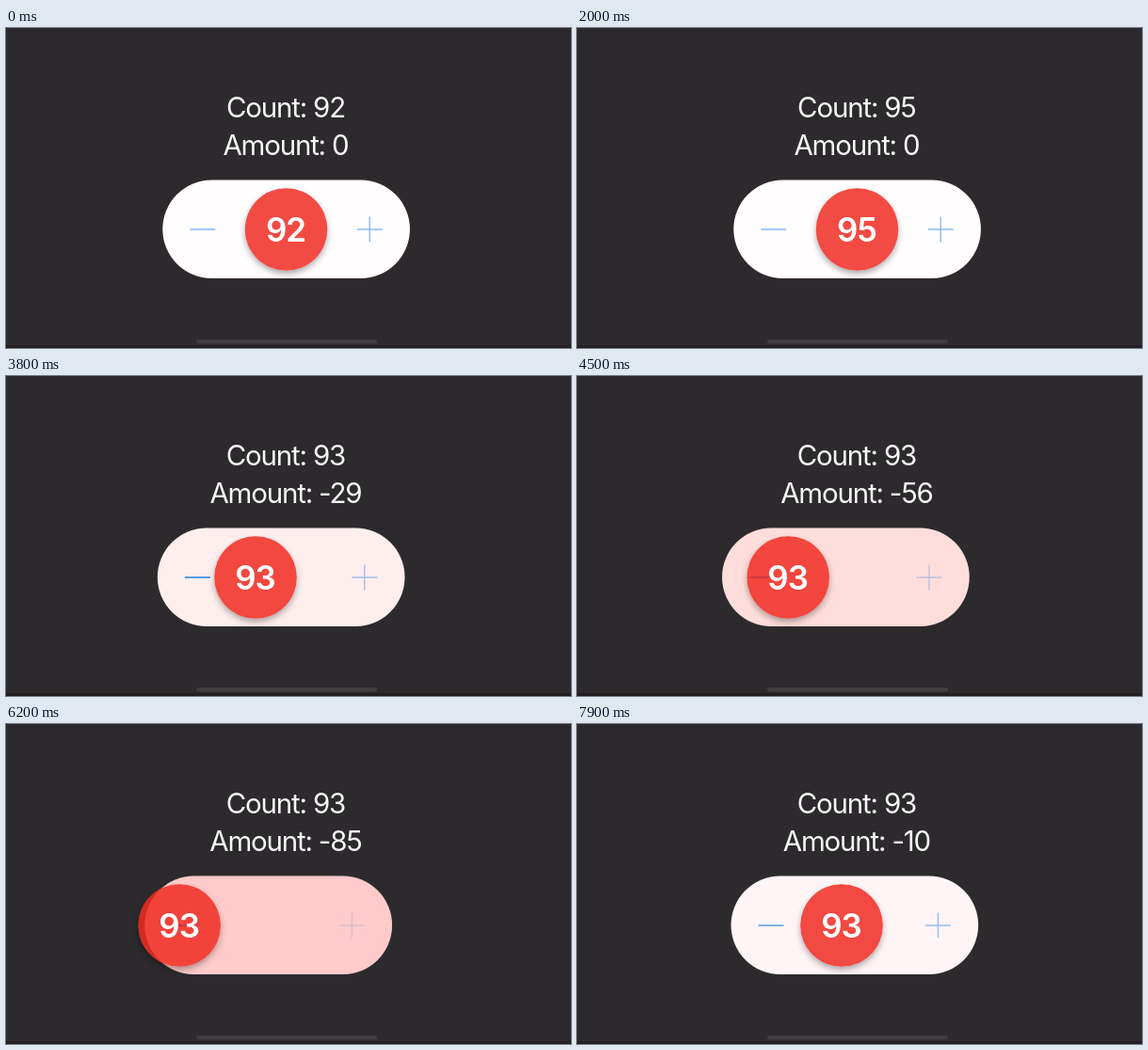
Write an HTML page with a canvas that moves like this. It is 600 by 340 pixels and loops after 8 s.

```html
<!DOCTYPE html>
<html lang="en">
<head>
<meta charset="utf-8">
<title>Stepper</title>
<style>
html, body { margin: 0; width: 100%; height: 100%; overflow: hidden; background: #2c2a2c; }
canvas { display: block; width: 600px; height: 340px; }
</style>
</head>
<body>
<canvas id="stage"></canvas>
<script>
const LOOP = 8000, STEP = 100;
const CX = 297.5, CY = 214, KNOB_R = 43.8, REACH = 130;
const FONT = 'Inter, "Open Sans", sans-serif';

const canvas = document.getElementById('stage');
const ctx = canvas.getContext('2d');
const ratio = window.devicePixelRatio || 1;
canvas.width = 600 * ratio;
canvas.height = 340 * ratio;
ctx.scale(ratio, ratio);

// Knob offset along the drag: [ms, px]
const drag = [
  [3100, 0], [3600, -20], [4000, -46], [4500, -73.3], [4600, -74], [4900, -83],
  [5400, -97], [5800, -109], [6100, -114.3], [6200, -113.4], [6700, -81],
  [7200, -54], [7600, -25], [7900, -16.5], [8100, -12]
];

// Taps: [press, release, side, count afterwards]
const taps = [
  [100, 300, 1, 93], [500, 800, 1, 94], [1300, 1600, 1, 95],
  [2100, 2400, -1, 94], [2500, 2700, -1, 93]
];

const clamp = (v, lo = 0, hi = 1) => Math.min(hi, Math.max(lo, v));

function slope(i) {
  const [a, b, c] = [drag[i - 1], drag[i], drag[i + 1]];
  if (!a || !c) return 0;
  const s = (b[1] - a[1]) / (b[0] - a[0]);
  const r = (c[1] - b[1]) / (c[0] - b[0]);
  return s * r > 0 ? 2 * s * r / (s + r) : 0;
}

// Monotone cubic through the drag points
function offsetAt(t) {
  if (t <= drag[0][0]) return 0;
  let i = 0;
  while (i < drag.length - 2 && t > drag[i + 1][0]) i++;
  const [t0, x0] = drag[i], [t1, x1] = drag[i + 1];
  const h = t1 - t0, u = (t - t0) / h, v = 1 - u;
  return x0 * (1 + 2 * u) * v * v + x1 * u * u * (3 - 2 * u)
    + h * u * v * (slope(i) * v - slope(i + 1) * u);
}

function countAt(t) {
  let count = 92;
  for (const [, release, , next] of taps) if (t >= release) count = next;
  return count;
}

function label(text, x, y, size, weight, spacing) {
  ctx.font = `${weight} ${size}px ${FONT}`;
  ctx.letterSpacing = spacing + 'px';
  ctx.textAlign = 'center';
  ctx.fillText(text, x + spacing / 2, y);
}

function pill(x, y, w, h, color) {
  ctx.fillStyle = color;
  ctx.beginPath();
  ctx.roundRect(x, y, w, h, h / 2);
  ctx.fill();
}

function disc(x, y, r, color) {
  ctx.fillStyle = color;
  ctx.beginPath();
  ctx.arc(x, y, r, 0, 7);
  ctx.fill();
}

function icon(x, plus, alpha, width) {
  ctx.strokeStyle = `rgba(22,122,225,${alpha})`;
  ctx.lineWidth = width;
  ctx.beginPath();
  ctx.moveTo(x - 13.5, CY);
  ctx.lineTo(x + 13.5, CY);
  if (plus) {
    ctx.moveTo(x, CY - 13.5);
    ctx.lineTo(x, CY + 13.5);
  }
  ctx.stroke();
}

function highlights(shift, t) {
  for (const [press, release, side] of taps) {
    const level = clamp((t - press + 100) / 200) * clamp(1 - (t - release) / 300);
    if (t >= press && level > 0) {
      disc(CX + side * 88.7 + shift, CY, 31, `rgba(22,122,225,${0.1 * level})`);
    }
  }
}

// The shadow stays outside the translucent disc
function knobShadow(x) {
  ctx.save();
  ctx.beginPath();
  ctx.rect(0, 0, 600, 340);
  ctx.arc(x, CY, KNOB_R, 0, 7);
  ctx.clip('evenodd');
  ctx.shadowColor = 'rgba(0,0,0,0.36)';
  ctx.shadowBlur = 7 * ratio;
  ctx.shadowOffsetY = 3.5 * ratio;
  disc(x, CY, KNOB_R - 0.5, '#000');
  ctx.restore();
}

function draw(t) {
  const offset = offsetAt(t), shift = offset / 6;
  const pull = clamp(-offset / REACH);
  const amount = Math.trunc(offsetAt(t + 80) / REACH * 100);
  const knobX = CX + offset;

  ctx.fillStyle = '#2c2a2c';
  ctx.fillRect(0, 0, 600, 340);
  ctx.fillStyle = '#241e20';
  ctx.fillRect(0, 337, 600, 3);
  pill(202, 331, 192, 4.5, '#403e40');

  ctx.fillStyle = '#f7f6f7';
  label('Count: ' + countAt(t), CX, 95, 29.5, 400, -1.2);
  label('Amount: ' + amount, CX, 135, 29.5, 400, -1.2);

  pill(166.3 + shift, 161.5, 262.6, 104.6, '#fffdfe');
  pill(166.3 + shift, 161.5, 262.6, 104.6, `rgba(255,67,59,${0.31 * pull})`);
  highlights(shift, t);
  icon(CX - 88.7 + shift, false, clamp(0.52 + pull * 1.1), 1.5 + clamp(pull * 1.2, 0, 0.5));
  icon(CX + 88.7 + shift, true, 0.5 - pull * 0.38, 1.4);

  knobShadow(knobX);
  disc(knobX, CY, KNOB_R, 'rgba(240,44,35,0.85)');
  ctx.fillStyle = '#fff';
  label(String(countAt(t - 100)), knobX, 226.6, 35, 600, -1);
}

function tick(now) {
  draw(Math.floor(now % LOOP / STEP) * STEP);
  requestAnimationFrame(tick);
}
requestAnimationFrame(tick);
</script>
</body>
</html>
```
